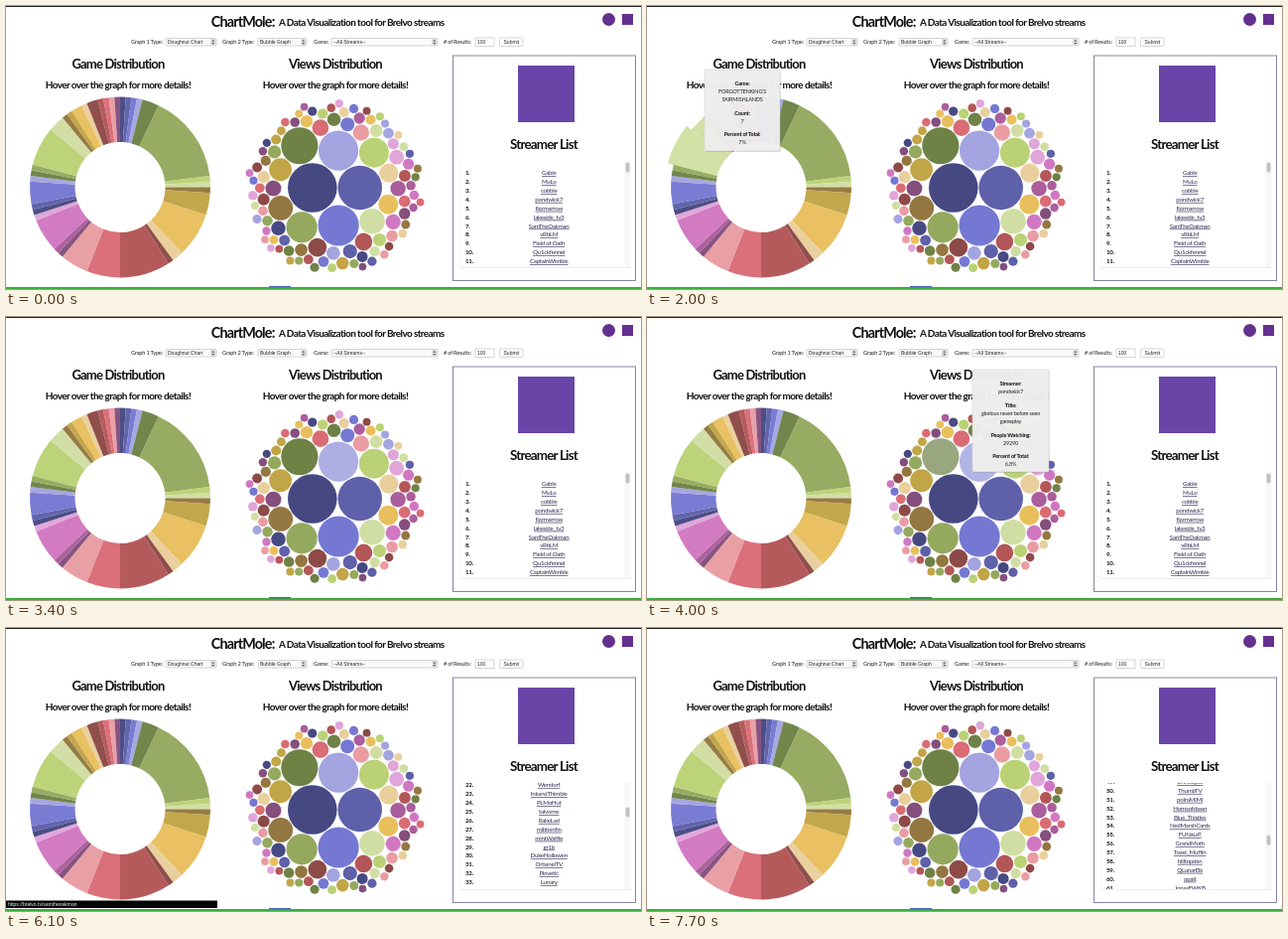
Write an HTML page that moves like this. It is 640 px wide and 285 px high and loops after 7.8 s.

```html
<!DOCTYPE html>
<html lang="en">
<head>
<meta charset="utf-8">
<title>Stream dashboard</title>
<style>
  html, body { margin: 0; width: 100%; height: 100%; overflow: hidden; background: #fff; }
  svg { display: block; width: 640px; height: 285px; }
  text { font-family: Lato, "Open Sans", sans-serif; letter-spacing: -.04em; fill: #222; }
  .b, .h { font-weight: 700; fill: #111; }
  .h { letter-spacing: -.06em; }
  .ui { font-family: "Liberation Sans", Arial, sans-serif; letter-spacing: 0; }
  .link { text-decoration: underline; fill: #2f2c55; }
</style>
</head>
<body>
<svg id="stage" viewBox="0 0 640 285"></svg>
<script>
const LOOP = 7800, ROW = 8.87, TAU = Math.PI * 2;
const stage = document.getElementById('stage');
const colors = ('393b79 5254a3 6b6ecf 9c9ede 637939 8ca252 b5cf6b cedb9c 8c6d31 bd9e39 ' +
  'e7ba52 e7cb94 843c39 ad494a d6616b e7969c 7b4173 a55194 ce6dbd de9ed6').split(' ').map(c => '#' + c);

function add(tag, attrs, parent = stage) {
  const el = document.createElementNS('http://www.w3.org/2000/svg', tag);
  for (const k in attrs) el.setAttribute(k, attrs[k]);
  return parent.appendChild(el);
}
const rect = (x, y, width, height, fill, more, parent) =>
  add('rect', { x, y, width, height, fill, ...more }, parent);
function text(str, x, y, size, cls = '', anchor = 'middle', parent) {
  const el = add('text', { x, y, 'font-size': size, class: cls, 'text-anchor': anchor }, parent);
  el.textContent = str;
  return el;
}

// Page header
rect(0, 0, 640, 1, '#222');
text('ChartMole:', 270.5, 21, 14.4, 'h', 'end');
text('A Data Visualization tool for Brelvo streams', 275, 20, 10, 'h', 'start');
add('circle', { cx: 607.5, cy: 13.5, r: 6.5, fill: '#64308f' });
rect(621, 8, 11, 11, '#64308f');

// Controls
function select(label, x, boxX, w, value) {
  text(label, x, 38, 5.7, '', 'start');
  rect(boxX, 32.5, w, 7.5, '#fafafa', { rx: 1, stroke: '#bbb', 'stroke-width': .6 });
  text(value, boxX + 2, 38, 5, 'ui', 'start');
  rect(boxX + w - 6, 32.8, 5.7, 7, '#ddd');
  add('path', { d: `M${boxX + w - 4.6} 35.7l1.4-1.8 1.4 1.8zm0 1.2l1.4 1.8 1.4-1.8z`, fill: '#555' });
}
select('Graph 1 Type:', 126, 161, 51, 'Doughnut Chart');
select('Graph 2 Type:', 218, 254, 49, 'Bubble Graph');
select('Game:', 310, 328, 107, '--All Streams--');
text('# of Results:', 441, 38, 5.7, '', 'start');
rect(473, 32, 19, 8.5, '#fff', { stroke: '#bbb', 'stroke-width': .6 });
text('100', 475, 38, 5, 'ui', 'start');
rect(497.5, 32, 23.5, 8.5, '#fff', { rx: 1.5, stroke: '#bbb', 'stroke-width': .6 });
text('Submit', 509.3, 38, 5, 'ui');

// Chart headings
for (const [title, x] of [['Game Distribution', 113], ['Views Distribution', 332]]) {
  text(title, x, 63, 13, 'h');
  text('Hover over the graph for more details!', x, 83, 10, 'h');
}

// Doughnut: one count per game, out of 100
const counts = [1, 1, 1, 1, 3, 16, 1, 1, 1, 4, 8, 2, 1, 9, 6, 5, 1, 1, 6, 1,
  1, 1, 4, 1, 1, 1, 7, 3, 1, 1, 2, 1, 2, 1, 1, 1, 1];
function slicePath(from, to, R) {
  const r = 45.5;
  const at = (f, rad) => `${115 + rad * Math.sin(f * TAU)} ${182.5 - rad * Math.cos(f * TAU)}`;
  return `M${at(from, R)}A${R} ${R} 0 0 1 ${at(to, R)}L${at(to, r)}A${r} ${r} 0 0 0 ${at(from, r)}Z`;
}
let sum = 0;
const slices = counts.map((n, i) => {
  const from = sum / 100, to = (sum += n) / 100;
  const el = add('path', { d: slicePath(from, to, 91), fill: colors[i % 20], opacity: .9 });
  return { el, from, to };
});

// Bubbles: front-chain circle packing
function place(b, a, c) {
  const dx = b.x - a.x, dy = b.y - a.y, d2 = dx * dx + dy * dy;
  const a2 = (a.r + c.r) ** 2, b2 = (b.r + c.r) ** 2;
  const x = (d2 + a2 - b2) / (2 * d2), y = Math.sqrt(Math.max(0, a2 / d2 - x * x));
  c.x = a.x + x * dx - y * dy;
  c.y = a.y + x * dy + y * dx;
}
const hits = (a, b) => a.r + b.r - 1e-6 > Math.hypot(a.x - b.x, a.y - b.y);
const link = (a, b) => { a.next = b; b.prev = a; };
function score(a) {
  const b = a.next, s = a.r + b.r;
  return Math.hypot((a.x * b.r + b.x * a.r) / s, (a.y * b.r + b.y * a.r) / s);
}
function pack(list) {
  let [a, b, c] = list;
  Object.assign(a, { x: -b.r, y: 0 });
  Object.assign(b, { x: a.r, y: 0 });
  place(b, a, c);
  link(a, b); link(b, c); link(c, a);
  outer: for (let i = 3; i < list.length; i++) {
    c = list[i];
    place(a, b, c);
    let j = b.next, k = a.prev, sj = b.r, sk = a.r;
    do {
      if (sj <= sk) {
        if (hits(j, c)) { b = j; link(a, b); i--; continue outer; }
        sj += j.r; j = j.next;
      } else {
        if (hits(k, c)) { a = k; link(a, b); i--; continue outer; }
        sk += k.r; k = k.prev;
      }
    } while (j !== k.next);
    link(a, c); link(c, b);
    b = c;
    let best = score(a);
    while ((c = c.next) !== b) {
      const s = score(c);
      if (s < best) { a = c; best = s; }
    }
    b = a.next;
  }
}
const bigRadii = [25.2, 22.7, 21, 20.5, 19, 16, 15.4, 13.2, 12.8, 11.8, 10.4, 10, 9.7, 9.2];
const bubbles = Array.from({ length: 100 }, (_, i) => ({ r: bigRadii[i] || 8.8 * (i / 14) ** -.38 }));
pack(bubbles);
bubbles.forEach((b, i) => {
  b.el = add('circle', { cx: 331.5 + b.x, cy: 183 + b.y, r: b.r - .4, fill: colors[i % 20], opacity: .93 });
});

// Streamer panel
rect(450.5, 50, 184, 226.5, '#fff', { stroke: '#8585a5', 'stroke-width': 1 });
rect(516, 60, 57, 57, '#6a45a8');
text('Streamer List', 542, 144, 13.4, 'h');
const names = ('Gable MuLo cobble pondwick7 fizzmarrow lakeside_tv3 SamTheOakman vRbLM Field_of_Oath ' +
  'Qu1ckfennel CaptainWimble oatkettle Mirthbox DuskPebble tallowfox Brindlecap nettlejam Ovenbird_2 ' +
  'plumcart Hazelgrit quillmop Wendorf InkandThimble PLMoHut talvorne RakeLad mibbenfin mintWaffle ' +
  'gr1b DukeHollowen OrbanelTV Plovetic Lunary Wickerly sootlamp BramblePat Zelvane moss_garden ' +
  'Kettledrum9 fernloaf Orchidol TinCandle puddlejay Varnoth Larkspool crumbvale Yewstone hopmallow ' +
  'Driftcopse ThumbTV polraMIMI Hornsofdawn Blue_Thistles NedMarshCards FUNaLeT GrandMoth Toast_Muffin ' +
  'hilltopden QLunarElk opalt JonasFWKB').split(' ').map((n, i) => i === 8 ? n.replace(/_/g, ' ') : n);
rect(457, 156, .5, 107, '#eee');
rect(457, 263, 173, .5, '#ddd');
rect(623.5, 156, 6, 107, '#f7f7f7');
const thumb = rect(624.5, 157.5, 4, 10, '#c2c2c2', { rx: 2 });
add('rect', { x: 457, y: 156, width: 166, height: 107 }, add('clipPath', { id: 'view' }));
const rows = add('g', {}, add('g', { 'clip-path': 'url(#view)' }));
names.forEach((name, i) => {
  const y = 170.3 + i * ROW;
  text(i + 1 + '.', 463, y, 6.2, 'b', 'start', rows);
  text(name, 547.2, y, 6.2, 'link', 'middle', rows);
});

// Tooltips: lines are [text, y], a trailing colon marks a label
function tooltip(x, y, w, h, lines) {
  const g = add('g', { opacity: 0 });
  rect(x + .7, y + 1, w, h, '#000', { opacity: .14, rx: 1 }, g);
  rect(x, y, w, h, '#efefef', { opacity: .97, rx: 1, stroke: '#d2d2d2', 'stroke-width': .6 }, g);
  for (const [str, ty] of lines) text(str, x + w / 2, ty, 5.6, str.endsWith(':') ? 'b' : '', 'middle', g);
  return g;
}
const gameTip = tooltip(58, 64, 76, 82, [['Game:', 80], ["FORGOTTENKING'S", 88], ['SKIRMISHLANDS', 96],
  ['Count:', 110], ['7', 118], ['Percent of Total:', 131], ['7%', 139]]);
const viewTip = tooltip(328, 53, 77, 103, [['Streamer:', 69], [names[3], 77], ['Title:', 90.5],
  ['glorious never before seen', 98.5], ['gameplay', 106.5], ['People Watching:', 120.5], ['29290', 128.5],
  ['Percent of Total:', 141.5], ['6.8%', 149.5]]);

// Window bottom and link status
rect(0, 283, 640, 2, '#35b13c');
rect(265, 282, 22, 1.2, '#4a5fc4');
const status = add('g', {});
rect(0, 274.5, 213, 7.5, '#050505', {}, status);
text('https://brelvo.tv/samtheoakman', 2, 280, 5, 'ui', 'start', status).style.fill = '#eee';

const clamp = v => Math.max(0, Math.min(1, v));
const pulse = (t, from, to, fade = 150) => clamp(Math.min(t - from, to - t) / fade);
const set = (el, key, v) => el.setAttribute(key, v);
const scrollKeys = [[5300, 0], [6100, 196], [7700, 439], [LOOP, 439]];
function scrollAt(t) {
  if (t <= scrollKeys[0][0]) return 0;
  const i = scrollKeys.findIndex(k => t <= k[0]);
  const [t0, y0] = scrollKeys[i - 1], [t1, y1] = scrollKeys[i];
  return y0 + (y1 - y0) * (t - t0) / (t1 - t0);
}

function draw(t) {
  const game = pulse(t, 900, 2200), slice = slices[26];
  set(slice.el, 'd', slicePath(slice.from, slice.to, 91 + 6 * game));
  set(slice.el, 'opacity', .9 - .3 * game);
  set(gameTip, 'opacity', game);

  const view = pulse(t, 3500, 4500);
  set(viewTip, 'opacity', view);
  set(bubbles[4].el, 'opacity', .93 - .28 * view);
  set(bubbles[3].el, 'opacity', .93 - .3 * pulse(t, 3350, 4080));
  set(bubbles[6].el, 'opacity', .93 - .3 * pulse(t, 4400, 4880));

  const y = scrollAt(t);
  set(rows, 'transform', `translate(0 ${-y})`);
  set(thumb, 'y', 157.5 + y * .117);
  set(status, 'opacity', pulse(t, 5200, 7680, 100));
}
function tick() {
  draw(performance.now() % LOOP);
  requestAnimationFrame(tick);
}
tick();
</script>
</body>
</html>
```
